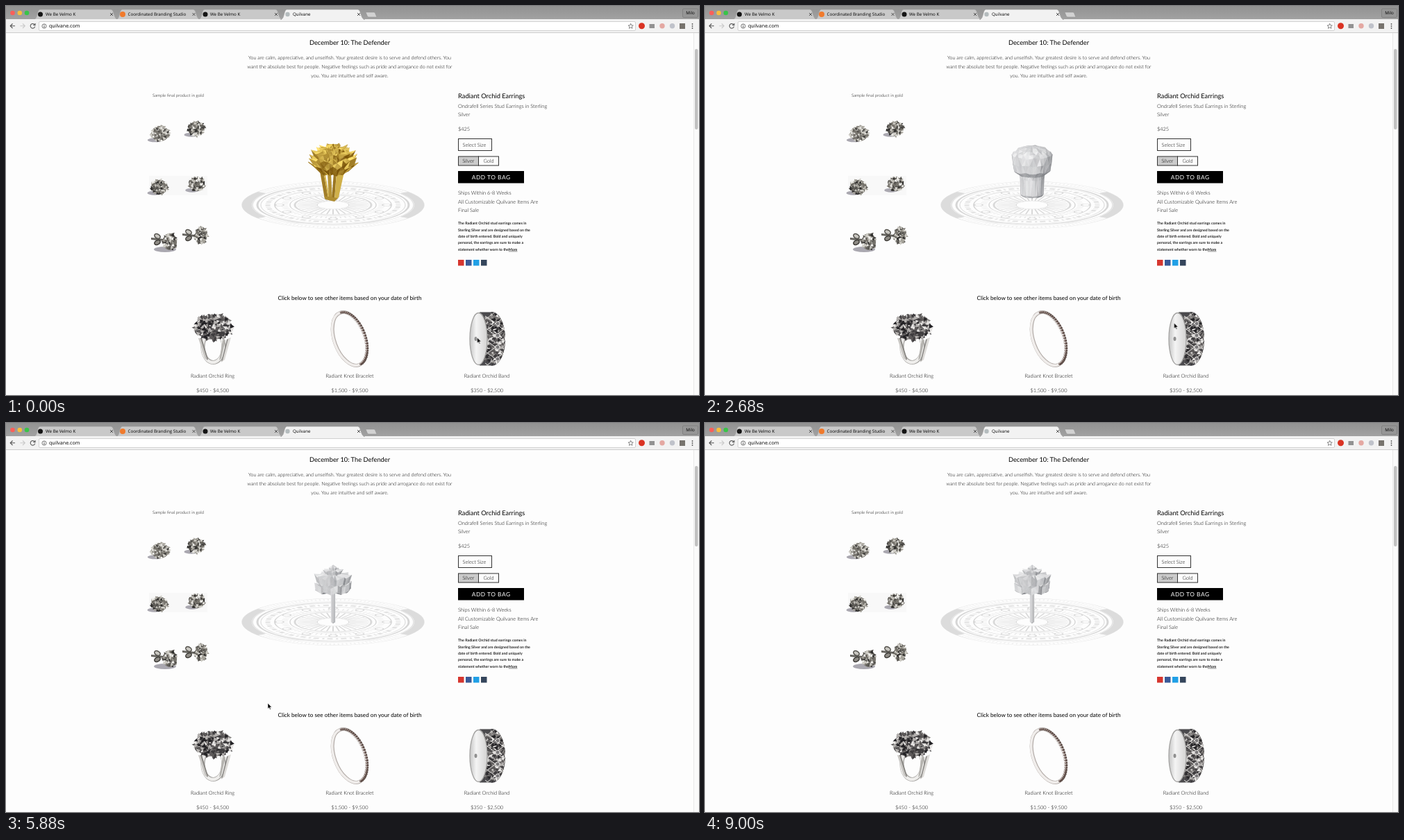
Recreate the animation shown at these times as an HTML page with a canvas. Size 998 by 561 pixels, loop 9040 ms.

```html
<!DOCTYPE html>
<html lang="en">
<head>
<meta charset="utf-8">
<title>Quilvane</title>
<style>
html, body { margin: 0; width: 100%; height: 100%; overflow: hidden; background: #fdfdfd; }
canvas, svg { position: absolute; left: 0; top: 0; width: 998px; height: 561px; }
text { font-family: Lato, "Open Sans", sans-serif; font-size: 7.4px; font-weight: 300; fill: #000; text-rendering: geometricPrecision; }
.head { font-size: 9.3px; font-weight: 400; }
.sub { font-size: 8.2px; font-weight: 400; }
.intro { font-size: 7.1px; }
.note { font-size: 6.2px; }
.fine { font-size: 5.25px; font-weight: 700; fill: #222; }
.bag { font-size: 8.4px; font-weight: 400; fill: #fff; letter-spacing: .5px; }
.ui text { font-family: "Open Sans", Roboto, sans-serif; font-size: 6.2px; font-weight: 400; }
.ui .url { font-size: 7.1px; }
.mid { text-anchor: middle; }
.line { fill: none; stroke: #555; stroke-width: 1.1; }
#cursor { animation: glide 9040ms linear infinite, hide 9040ms step-end infinite; }
@keyframes glide {
  0%, 25% { transform: translate(678.5px, 478px); }
  29.6% { transform: translate(675.5px, 457px); animation-timing-function: ease-in-out; }
  38%, 100% { transform: translate(377px, 404px); }
}
@keyframes hide {
  0% { opacity: 1; }
  70%, 100% { opacity: 0; }
}
</style>
</head>
<body>
<canvas id="still" width="998" height="561"></canvas>
<canvas id="model" width="998" height="561"></canvas>
<svg viewBox="0 0 998 561">
  <defs>
    <linearGradient id="strip" x2="0" y2="1"><stop stop-color="#929292"/><stop offset="1" stop-color="#a2a2a2"/></linearGradient>
    <path id="tab" d="M0 19.5C3 19 4 16 5 12Q6.500 5 9 5H111Q114 5 115.500 12C117 16 118 19 121 19.500Z" stroke="#a0a0a0" stroke-width=".6"/>
    <path id="close" d="M-2-2 2 2M2-2-2 2" stroke="#444" stroke-width=".9"/>
  </defs>
  <g class="ui">
    <rect width="998" height="20" fill="url(#strip)"/>
    <circle cx="9.500" cy="10" r="3.300" fill="#f9605a"/>
    <circle cx="19.800" cy="10" r="3.300" fill="#f8be3c"/>
    <circle cx="30" cy="10" r="3.300" fill="#39c449"/>
    <g fill="#c9c9c9"><use href="#tab" x="277"/><use href="#tab" x="158.500"/><use href="#tab" x="40"/></g>
    <path d="M518 9H529.500Q531 9 531.500 10L534 16H523Q521 16 520.500 15Z" fill="#d2d2d2" stroke="#8b8b8b" stroke-width=".5"/>
    <rect y="19" width="998" height="19.500" fill="#f2f2f2"/>
    <use href="#tab" x="395.500" fill="#f2f2f2"/>
    <rect x="397" y="19" width="118" height="2" fill="#f2f2f2"/>
    <rect y="38" width="998" height="1" fill="#cdcdcd"/>
    <circle cx="49.500" cy="12" r="3.500" fill="#151515"/>
    <circle cx="168" cy="12" r="4" fill="#f07a2c"/>
    <circle cx="287" cy="12" r="3.500" fill="#151515"/>
    <circle cx="405.500" cy="12" r="3.200" fill="#b5bcbe"/>
    <text x="57" y="14.200">We Be Velmo K</text>
    <text x="175.500" y="14.200">Coordinated Branding Studio</text>
    <text x="294" y="14.200">We Be Velmo K</text>
    <text x="413" y="14.200">Quilvane</text>
    <use href="#close" x="152" y="12"/><use href="#close" x="270.500" y="12"/>
    <use href="#close" x="389" y="12"/><use href="#close" x="508" y="12"/>
    <rect x="974.500" y="4" width="22" height="12.500" rx="1.500" fill="#969696" stroke="#777" stroke-width=".7"/>
    <text class="mid" x="985.500" y="12.300">Milo</text>
    <path class="line" d="M13 28.800H6.500M9.500 25.500 6.200 28.800 9.500 32"/>
    <path class="line" d="M20.500 28.800H27M24 25.500 27.300 28.800 24 32" style="stroke:#c9c9c9"/>
    <path class="line" d="M41.200 27A3.300 3.300 0 1 0 41.700 29.600M42 25V27.700H39.300"/>
    <rect x="47.500" y="22.500" width="859" height="13" rx="1.500" fill="#fff" stroke="#c8c8c8" stroke-width=".8"/>
    <circle class="line" cx="55" cy="29" r="3.100" style="stroke-width:.8"/>
    <path class="line" d="M55 28.500V31M55 26.900V27.700"/>
    <text class="url" x="62" y="31.400">quilvane.com</text>
    <path class="line" d="M899.700 25.300 900.700 27.800 903.300 28 901.300 29.700 902 32.300 899.700 30.900 897.400 32.300 898.100 29.700 896.100 28 898.700 27.800Z" style="stroke-width:.7"/>
    <circle cx="915.500" cy="28.800" r="4.500" fill="#da3323"/>
    <rect x="926.500" y="26" width="7.500" height="6" fill="#929292"/>
    <circle cx="945" cy="28.800" r="3.700" fill="#e4a8a2"/>
    <circle cx="959.500" cy="28.800" r="3.700" fill="#bfc2ca"/>
    <rect x="970" y="25" width="8" height="8" fill="#77736d"/>
    <g fill="#555"><circle cx="988.500" cy="26" r=".9"/><circle cx="988.500" cy="29" r=".9"/><circle cx="988.500" cy="32" r=".9"/></g>
  </g>
  <rect x="990" y="39" width="8" height="522" fill="#fafafa"/>
  <path d="M990.500 39V561" stroke="#e9e9e9"/>
  <rect x="992" y="62" width="4.500" height="116" rx="2.200" fill="#c1c1c1"/>

  <g class="mid">
    <text class="head" x="495" y="55.800">December 10: The Defender</text>
    <text class="intro"><tspan x="495" y="76.700">You are calm, appreciative, and unselfish. Your greatest desire is to serve and defend others. You</tspan><tspan x="495" y="89.700">want the absolute best for people. Negative feelings such as pride and arrogance do not exist for</tspan><tspan x="495" y="102.700">you. You are intuitive and self aware.</tspan></text>
    <text class="note" x="248" y="130.800">Sample final product in gold</text>
    <text class="sub" x="495" y="424.300">Click below to see other items based on your date of birth</text>
    <text x="297.500" y="536.200">Radiant Orchid Ring</text><text x="297.500" y="556.800">$450 - $4,500</text>
    <text x="495" y="536.200">Radiant Knot Bracelet</text><text x="495" y="556.800">$1,500 - $9,500</text>
    <text x="692.500" y="536.200">Radiant Orchid Band</text><text x="692.500" y="556.800">$350 - $2,500</text>
  </g>

  <text class="head" x="651" y="133.200">Radiant Orchid Earrings</text>
  <text><tspan x="651" y="147.200">Ondrafell Series Stud Earrings in Sterling</tspan><tspan x="651" y="159.400">Silver</tspan><tspan x="651" y="179.600">$425</tspan></text>
  <g stroke="#333" fill="none">
    <rect x="651.500" y="191.500" width="48" height="17"/>
    <rect x="651.500" y="217" width="29" height="13" fill="#cbcbcb"/>
    <rect x="680.500" y="217" width="29" height="13"/>
  </g>
  <text x="657.500" y="202.700">Select Size</text>
  <text class="mid" x="665.800" y="226.200">Silver</text>
  <text class="mid" x="695" y="226.200">Gold</text>
  <rect x="651" y="238" width="95" height="17.500"/>
  <text class="bag mid" x="698.700" y="249.900">ADD TO BAG</text>
  <text><tspan x="651" y="272">Ships Within 6-8 Weeks</tspan><tspan x="651" y="284.700">All Customizable Quilvane Items Are</tspan><tspan x="651" y="297.300">Final Sale</tspan></text>
  <text class="fine"><tspan x="651" y="315.300">The Radiant Orchid stud earrings comes in</tspan><tspan x="651" y="324.700">Sterling Silver and are designed based on the</tspan><tspan x="651" y="334">date of birth entered. Bold and uniquely</tspan><tspan x="651" y="343.400">personal, the earrings are sure to make a</tspan><tspan x="651" y="352.700">statement whether worn to the</tspan><tspan text-decoration="underline">More</tspan></text>
  <rect x="651" y="366" width="8.500" height="8.500" fill="#d6362f"/>
  <rect x="662" y="366" width="8.500" height="8.500" fill="#3a5a98"/>
  <rect x="673" y="366" width="8.500" height="8.500" fill="#20a0e6"/>
  <rect x="684" y="366" width="8.500" height="8.500" fill="#35465c"/>
  <path id="cursor" d="M0 0V8.200L1.900 6.500 3.100 9.300 4.400 8.700 3.200 6H5.700Z" fill="#000" stroke="#fff" stroke-width=".6"/>
</svg>
<script>
const LOOP = 9040, TAU = Math.PI * 2;
const clamp = v => Math.max(0, Math.min(1, v));
const mix = (a, b, k) => a + (b - a) * k;
const context = id => document.getElementById(id).getContext('2d');

function random(seed) {
  return () => {
    seed = (seed + 0x6D2B79F5) | 0;
    let n = Math.imul(seed ^ seed >>> 15, 1 | seed);
    n ^= n + Math.imul(n ^ n >>> 7, 61 | n);
    return ((n ^ n >>> 14) >>> 0) / 4294967296;
  };
}

// Still product pictures
const p = context('still');
const silver = ['#2c2b2a', '#53514d', '#77746d', '#a5a29a', '#cfcdc6', '#f0efeb'];
const dark = ['#242326', '#3f3d3f', '#5d5a5a', '#84817f', '#b3b0ae', '#e6e4e2'];

function oval(x, y, rx, ry, fill, stroke, width = 1, turn = 0) {
  p.beginPath();
  p.ellipse(x, y, rx, ry, turn, 0, TAU);
  if (fill) { p.fillStyle = fill; p.fill(); }
  if (stroke) { p.strokeStyle = stroke; p.lineWidth = width; p.stroke(); }
}

function shape(c, fill, ...xy) {
  c.beginPath();
  for (let i = 0; i < xy.length; i += 2) c.lineTo(xy[i], xy[i + 1]);
  c.closePath();
  c.fillStyle = fill;
  c.fill();
}

function cluster(x, y, rx, ry, count, size, tones, seed) {
  const rnd = random(seed);
  oval(x, y, rx * .85, ry * .85, tones[2]);
  for (let i = 0; i < count; i++) {
    const a = rnd() * TAU, d = Math.sqrt(rnd()) * .88, turn = rnd() * TAU;
    const cx = x + Math.cos(a) * rx * d, cy = y + Math.sin(a) * ry * d;
    const points = [0, 2, 4.2].flatMap(s => {
      const r = size * (.6 + rnd() * .6);
      return [cx + Math.cos(turn + s) * r, cy + Math.sin(turn + s) * r];
    });
    shape(p, tones[rnd() * tones.length | 0], ...points);
  }
}

function stud(x, y, rx, ry, seed) {
  oval(x - 7, y + ry * .72, rx * .75, 3, '#aaa8b0');
  cluster(x, y, rx, ry, 90, 2.8, silver, seed);
}

function post(x, y) {
  shape(p, '#66645f', x, y - 1, x - 18, y - 3, x - 18, y, x, y + 2);
  oval(x - 9, y - 5, 4.5, 3, '#c9c7c1', '#54524d', 1.5, .5);
  oval(x - 9, y + 4, 4.5, 3, '#8f8c86', '#3f3d39', 1.5, -.5);
}

function drawPhotos() {
  p.fillStyle = '#f8f8f8';
  p.fillRect(206, 245, 84, 28);
  stud(222, 184, 15, 13, 3);
  stud(274, 177, 14, 12, 8);
  stud(221, 261, 14, 12, 5);
  stud(275, 257, 13, 12, 12);
  oval(229, 351, 16, 4, '#aaa8b0');
  post(227, 337);
  cluster(236, 340, 12, 14, 80, 3, silver, 21);
  post(272, 331);
  cluster(281, 331, 10, 14, 80, 3, silver, 30);

  // Ring
  oval(298.5, 492, 15, 22, null, '#a5a3a0', 6);
  oval(298, 492, 15, 22, null, '#efeeec', 4.3);
  shape(p, '#c9c7c4', 277, 479, 281, 479, 290, 511, 286, 508);
  shape(p, '#85837f', 280, 479, 282, 479, 291, 509, 290, 511);
  shape(p, '#b5b3af', 312, 482, 316, 482, 310, 508, 307, 511);
  shape(p, '#dddbd8', 319, 480, 324, 478, 315, 510, 310, 514);
  shape(p, '#8b8986', 318, 481, 320, 480, 312, 511, 310, 513);
  cluster(298.5, 463, 31, 21, 260, 3.9, dark, 44);

  // Bracelet
  const tilt = -.35;
  oval(495, 480, 22, 40, null, '#b0a9a5', 5, tilt);
  oval(494.5, 480, 22, 40, null, '#f0edeb', 3.6, tilt);
  for (let i = 0; i < 31; i++) {
    const a = mix(-1.5, 1.45, i / 30), u = 22.5 * Math.cos(a), v = 40 * Math.sin(a);
    const x = 495 + u * Math.cos(tilt) - v * Math.sin(tilt);
    const y = 480 + u * Math.sin(tilt) + v * Math.cos(tilt);
    oval(x, y, 2.1, 1.6, '#55443f');
    oval(x - .9, y - .4, .9, .8, '#c4b3ad');
  }

  // Band
  p.save();
  p.beginPath();
  p.ellipse(700, 480, 19, 39, 0, 0, TAU);
  p.rect(682, 441.5, 18, 77);
  p.clip();
  p.fillStyle = '#4b4a4d';
  p.fillRect(660, 435, 65, 90);
  cluster(702, 480, 22, 41, 280, 3.5, dark, 70);
  p.strokeStyle = '#c9c7c4';
  p.lineWidth = 1;
  for (let y = 430; y < 530; y += 17) {
    p.beginPath();
    p.moveTo(690, y); p.lineTo(720, y + 22);
    p.moveTo(720, y); p.lineTo(690, y + 22);
    p.stroke();
    oval(708, y + 11, 3, 3, '#7c7a7c', '#e3e1df', 1);
  }
  p.restore();
  const inside = p.createLinearGradient(668, 0, 694, 0);
  inside.addColorStop(0, '#c5c5c5');
  inside.addColorStop(.35, '#f4f4f4');
  inside.addColorStop(1, '#d2d1d0');
  oval(680.5, 480, 12.5, 37.5, inside, '#a3a2a1', 1.3);
  oval(676.5, 480, 2, 3, '#8f8f8f');
}

// Engraved stand
function circle(r, width, color, dash = [], start = 0, span = TAU) {
  p.beginPath();
  p.arc(0, 0, r, start, start + span);
  p.setLineDash(dash);
  p.lineWidth = width;
  p.strokeStyle = color;
  p.stroke();
  p.setLineDash([]);
}

function drawStand() {
  p.save();
  p.translate(471, 287);
  p.scale(1, .258);
  circle(131, 1.5, '#e4e4e4');
  circle(116, 1.5, '#e0e0e0');
  circle(124, 8, '#f0f0f0', [2, 4]);
  circle(124, 14, '#dcdcdc', [], Math.PI - .6, 1.2);
  circle(124, 14, '#dcdcdc', [], -.6, 1.2);
  circle(109, 3, '#d6d6d6');
  circle(104, 1.5, '#e2e2e2');
  circle(94, 7, '#e2e2e2', [3, 5, 8, 4]);
  circle(84, 2, '#d8d8d8');
  circle(70, 9, '#e8e8e8', [2, 5]);
  circle(62, 1.5, '#d8d8d8');
  circle(55, 3, '#dadada');
  p.strokeStyle = '#d8d8d8';
  p.lineWidth = 2;
  for (let i = 0; i < 36; i++) {
    const x = Math.cos(i * TAU / 36), y = Math.sin(i * TAU / 36);
    p.beginPath();
    p.moveTo(x * 24, y * 24);
    p.lineTo(x * 52, y * 52);
    p.stroke();
    if (i % 3 === 0) {
      p.beginPath();
      p.arc(x * 77, y * 77, 6, 0, TAU);
      p.stroke();
    }
  }
  circle(23, 1.5, '#dcdcdc');
  p.restore();
}

// Turning jewel: radius and height per row, blended from form to form
const m = context('model');
const COLS = 32;
const forms = [
  { from: 0, to: 600, star: .2, lift: 4, rough: .14, noise: .75, gold: 1, shank: 1,
    r: [0, 8, 7, 18, 15, 27, 23, 31, 27, 29, 18, 0],
    y: [200, 202, 206, 205, 211, 212, 219, 221, 230, 230, 240, 242] },
  { from: 1300, to: 1700, star: .004, lift: 0, rough: .02, noise: .07, gold: 0, shank: 0,
    r: [0, 12, 20, 26, 30, 32, 32, 30, 27, 22, 14, 0],
    y: [197, 199, 202, 207, 214, 222, 231, 241, 250, 258, 263, 266] },
  { from: 2500, to: 2800, star: .05, lift: 1, rough: .06, noise: .14, gold: 0, shank: 0,
    r: [0, 12, 20, 25, 28, 28, 26, 17, 16.5, 16.5, 14, 0],
    y: [202, 204, 207, 211, 215, 226, 237, 244, 249, 271, 274, 275] },
  { from: 3500, to: LOOP, star: .13, lift: 3, rough: 0, noise: .12, gold: 0, shank: 0,
    r: [0, 5, 4, 13, 10, 24, 21, 24, 23, 2.3, 2.3, 0],
    y: [205, 209, 212, 213, 218, 221, 231, 232, 242, 244, 287, 288] }
];
const rnd = random(91);
const ROWS = forms[0].r.length;
const grid = () => Array.from({ length: ROWS }, () => Array.from({ length: COLS }, () => [rnd() - .5, rnd() - .5]));
const bumps = grid(), glints = grid();

function formAt(t) {
  let i = forms.length - 1;
  while (t < forms[i].from) i--;
  const a = forms[i], b = forms[i + 1] || a;
  const u = b === a ? 0 : clamp((t - a.to) / (b.from - a.to));
  const k = u * u * (3 - 2 * u), out = {};
  for (const key in a) {
    out[key] = Array.isArray(a[key]) ? a[key].map((v, n) => mix(v, b[key][n], k)) : mix(a[key], b[key], k);
  }
  return out;
}

function metal(s, gold) {
  const low = [mix(126, 120, gold), mix(128, 82, gold), mix(132, 8, gold)];
  const high = [mix(248, 255, gold), mix(248, 226, gold), mix(249, 110, gold)];
  return `rgb(${low.map((v, i) => Math.round(mix(v, high[i], s)))})`;
}

function drawShank(form) {
  m.globalAlpha = form.shank;
  const tone = s => metal(s, form.gold);
  shape(m, tone(.3), 452, 238, 457, 238, 464, 277, 459, 278);
  shape(m, tone(.7), 457, 238, 459, 238, 466, 277, 464, 277);
  shape(m, tone(.45), 463, 241, 468, 241, 470, 279, 465, 278);
  shape(m, tone(.25), 472, 240, 476, 240, 473, 280, 469, 280);
  shape(m, tone(.65), 476, 240, 488, 235, 479, 276, 473, 281);
  shape(m, tone(.4), 458, 274, 478, 277, 473, 282, 460, 279);
  m.globalAlpha = 1;
}

function drawJewel(form, spin) {
  const at = (i, j) => {
    const [out, up] = bumps[i][j % COLS], a = spin + j / COLS * TAU;
    const point = 1 - Math.abs((j + 2 * (i + 1 >> 1)) % 4 - 2);
    const r = form.r[i] * (1 + form.star * point + form.rough * out);
    const y = form.y[i] + form.rough * 14 * up - form.lift * point * form.r[i] / 30;
    return [r * Math.sin(a), y, r * Math.cos(a)];
  };
  const faces = [];
  const add = (a, b, c, glint) => {
    const u = b.map((v, i) => v - a[i]), v = c.map((w, i) => w - a[i]);
    const n = [u[1] * v[2] - u[2] * v[1], u[2] * v[0] - u[0] * v[2], u[0] * v[1] - u[1] * v[0]];
    if (n[2] - .2 * n[1] <= 0) return;
    const light = (-.32 * n[0] - .55 * n[1] + .77 * n[2]) / Math.hypot(...n);
    const z = (a[2] + b[2] + c[2] - .2 * (a[1] + b[1] + c[1])) / 3;
    faces.push({ z, shade: clamp(.22 + .68 * light + form.noise * glint),
      xy: [a, b, c].flatMap(q => [471 + q[0], q[1] + q[2] * .2]) });
  };
  for (let i = 0; i < ROWS - 1; i++) {
    for (let j = 0; j < COLS; j++) {
      const a = at(i, j), b = at(i, j + 1), c = at(i + 1, j), d = at(i + 1, j + 1);
      const [g, h] = glints[i][j];
      if ((i + j) % 2) { add(a, b, c, g); add(b, d, c, h); }
      else { add(a, b, d, g); add(a, d, c, h); }
    }
  }
  faces.sort((a, b) => a.z - b.z);
  m.lineWidth = .5;
  for (const f of faces) {
    shape(m, metal(f.shade, form.gold), ...f.xy);
    m.strokeStyle = m.fillStyle;
    m.stroke();
  }
}

function frame() {
  const t = performance.now() % LOOP, form = formAt(t);
  m.clearRect(400, 180, 140, 120);
  if (form.shank > 0) drawShank(form);
  drawJewel(form, t / LOOP * TAU * 1.5);
  requestAnimationFrame(frame);
}

drawPhotos();
drawStand();
frame();
</script>
</body>
</html>
```
